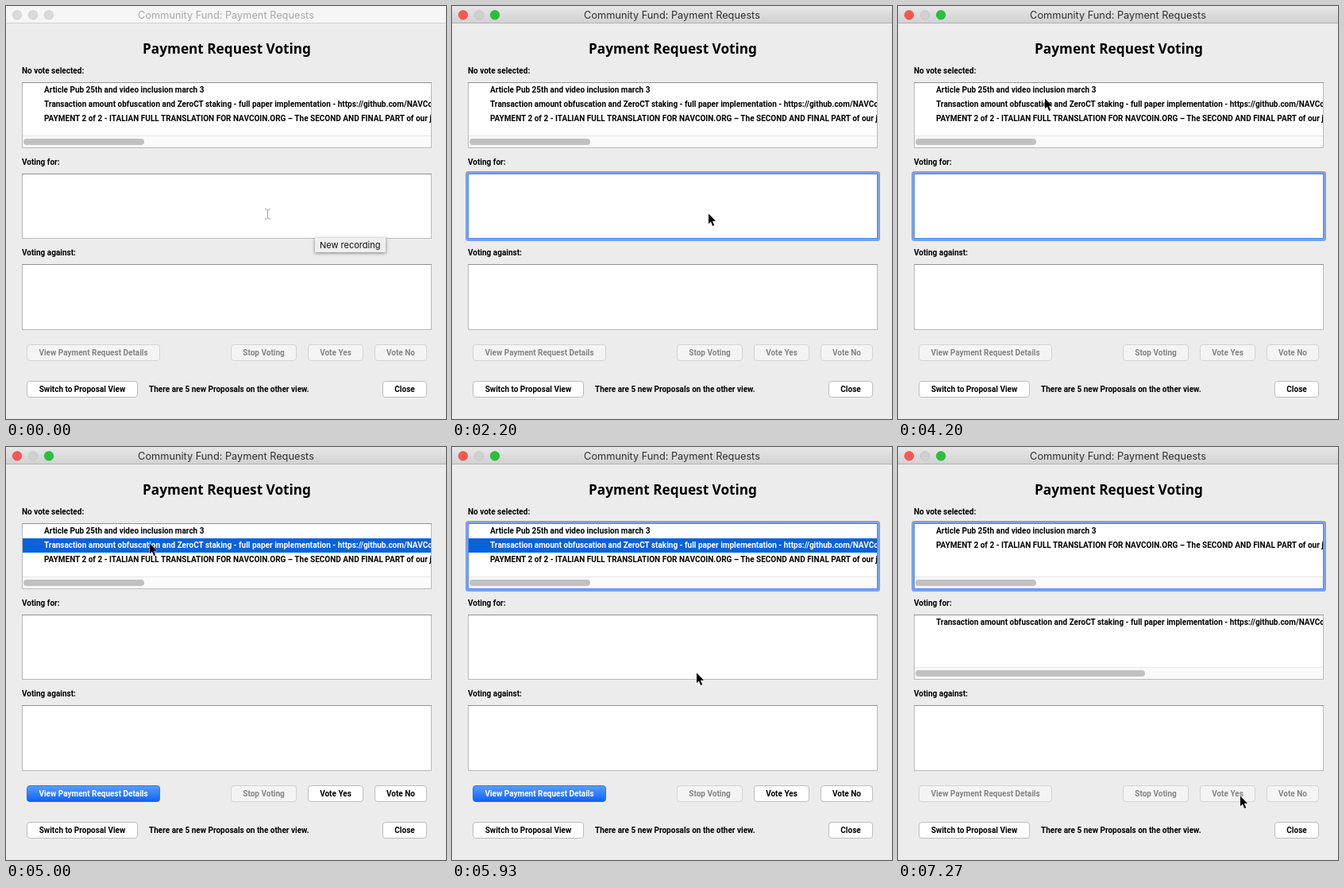
An HTML page for the animation above (8000 ms loop, 554x520 px).

```html
<!DOCTYPE html>
<html lang="en">
<head>
<meta charset="utf-8">
<title>Payment Requests</title>
<style>
  html, body { margin: 0; width: 100%; height: 100%; overflow: hidden; background: #ececec; }
  svg { display: block; width: 554px; height: 520px; cursor: default; }
  text { white-space: pre; font: bold 10px Roboto, sans-serif; }
  .caption { font: 12.75px Inter, sans-serif; text-anchor: middle; }
  .heading { font: 600 17.2px "Noto Sans", "Open Sans", sans-serif; text-anchor: middle; }
  .tip { font: 11px Inter, sans-serif; fill: #111; }
  .button text { text-anchor: middle; }
  .button rect { fill: #fff; stroke: #bdbdbd; }
  .button.off rect { fill: #f4f4f4; stroke: #d3d3d3; }
  .button.off text { fill: #858585; }
  .button.primary rect { fill: url(#blue); stroke: #2a73ee; }
  .button.primary text { fill: #fff; }
  #tooltip rect { fill: #efefef; filter: drop-shadow(0 1px 2px #0007); }
</style>
</head>
<body>
<svg id="stage" viewBox="0 0 554 520"></svg>
<script>
const LOOP = 8000, ACTIVATE = 930, SELECT = 5000, VOTE = 7130;

// Pointer stops: time, x, y
const STOPS = [
  [0, 328, 262], [1660, 328, 262], [1730, 325, 261], [2000, 325, 261],
  [2200, 322, 260], [3200, 200, 142], [3670, 188, 121], [4000, 188, 121],
  [4200, 184, 115], [4470, 180, 120], [5400, 180, 120],
  [6400, 413, 419], [7000, 430, 438], [LOOP, 430, 438]
];

const ARTICLE = "Article Pub 25th and video inclusion march 3";
const STAKING = "Transaction amount obfuscation and ZeroCT staking - full paper implementation - https://github.com/NAVCoin";
const ITALIAN = "PAYMENT 2 of 2 - ITALIAN FULL TRANSLATION FOR NAVCOIN.ORG – The SECOND AND FINAL PART of our journey";

const text = (x, y, label, attrs = "") => `<text x="${x}" y="${y}" ${attrs}>${label}</text>`;

const button = (id, x, y, width, label, state = "") =>
  `<g id="${id}" class="button ${state}">
    <rect x="${x + .5}" y="${y + .5}" width="${width - 1}" height="20" rx="3.5"/>
    ${text(x + width / 2, y + 14, label)}
  </g>`;

const listBox = (id, y, height) =>
  `<rect x="20.5" y="${y + .5}" width="515" height="${height - 1}" fill="#fff" stroke="#b9b9b9"/>
   <path d="M20 ${y + .5}H536" stroke="#929292"/>
   <g id="${id}" clip-path="url(#inside)"></g>
   <g id="${id}Ring" fill="none" opacity="0">
     <rect x="18.5" y="${y - 1.5}" width="519" height="${height + 3}" rx="2" stroke="#78a3ea" stroke-width="3"/>
     <rect x="20.5" y="${y + .5}" width="515" height="${height - 1}" stroke="#5389df"/>
   </g>`;

const scrollbar = (y, width) =>
  `<rect x="21" y="${y}" width="514" height="15" fill="#fafafa"/>
   <path d="M21 ${y + .5}H535" stroke="#e6e6e6"/>
   <rect x="22" y="${y + 4}" width="${width}" height="8" rx="4" fill="#c1c1c1"/>`;

const rows = (top, labels, selected = -1) => labels.map((label, i) =>
  (i === selected ? `<rect x="21" y="${top + 18 * i}" width="514" height="18" fill="#0862d9"/>` : "") +
  text(48, top + 12 + 18 * i, label, i === selected ? 'fill="#fff"' : "")).join("");

const gradient = (id, from, to) =>
  `<linearGradient id="${id}" x2="0" y2="1"><stop stop-color="${from}"/><stop offset="1" stop-color="${to}"/></linearGradient>`;

stage.innerHTML = `
  <defs>
    ${gradient("blue", "#5a9fff", "#0c60fc")}
    ${gradient("bar", "#e7e7e7", "#d2d2d2")}
    <clipPath id="inside"><rect x="21" y="90" width="514" height="330"/></clipPath>
  </defs>
  <rect width="554" height="520" fill="#ececec"/>
  <rect id="titleBar" width="554" height="21"/>
  <path id="barLine" d="M0 21.5H554"/>
  <g id="lights">${[14, 34, 54].map(x => `<circle cx="${x}" cy="11.3" r="5.8" stroke-width=".6"/>`).join("")}</g>
  ${text(277, 16, "Community Fund: Payment Requests", 'id="caption" class="caption"')}
  ${text(278, 60, "Payment Request Voting", 'class="heading"')}
  ${text(20, 85, "No vote selected:")}
  ${text(20, 200, "Voting for:")}
  ${text(20, 314, "Voting against:")}
  ${listBox("pending", 96, 83)}
  ${listBox("approved", 211, 82)}
  ${listBox("rejected", 325, 83)}
  ${button("details", 26, 426, 168, "View Payment Request Details")}
  ${button("stop", 283, 426, 83, "Stop Voting", "off")}
  ${button("yes", 380, 426, 70, "Vote Yes")}
  ${button("no", 464, 426, 66, "Vote No")}
  ${button("switchView", 26, 472, 140, "Switch to Proposal View")}
  ${button("closeView", 474, 472, 56, "Close")}
  ${text(180, 486, "There are 5 new Proposals on the other view.")}
  <g id="tooltip">
    <rect x="389" y="292" width="89" height="18"/>
    ${text(395, 305, "New recording", 'class="tip"')}
  </g>
  <path id="beam" d="M326 255.5Q329.5 255.5 329.5 258V266Q329.5 268.5 326 268.5M333 255.5Q329.5 255.5 329.5 258M329.5 266Q329.5 268.5 333 268.5"
    fill="none" stroke="#a0a0a0"/>
  <path id="arrow" d="M1 1.5V14.3L3.9 11.6L6.2 17L8.2 16.1L5.9 10.8H10Z" stroke="#fff" paint-order="stroke"/>`;

const get = id => document.getElementById(id);
const clamp = v => Math.min(1, Math.max(0, v));
const smooth = v => v * v * (3 - 2 * v);

function pointerAt(t) {
  const i = STOPS.findIndex(stop => stop[0] > t);
  const [t0, x0, y0] = STOPS[i - 1], [t1, x1, y1] = STOPS[i];
  const k = smooth((t - t0) / (t1 - t0));
  return [x0 + (x1 - x0) * k, y0 + (y1 - y0) * k];
}

function setWindow(active) {
  get("titleBar").setAttribute("fill", active ? "url(#bar)" : "#f6f6f6");
  get("barLine").setAttribute("stroke", active ? "#b2b2b2" : "#d2d2d2");
  get("caption").setAttribute("fill", active ? "#303030" : "#a8a8a8");
  const colors = active ? ["#fc5753", "#d0d0d0", "#27c13c"] : Array(3).fill("#dadada");
  const edges = active ? ["#df443f", "#bcbcbc", "#1aab29"] : Array(3).fill("#c8c8c8");
  [...get("lights").children].forEach((light, i) => {
    light.setAttribute("fill", colors[i]);
    light.setAttribute("stroke", edges[i]);
  });
}

function setPhase(phase) {
  const selected = phase === 2, voted = phase === 3;
  setWindow(phase > 0);
  get("pending").innerHTML = scrollbar(163, 152) +
    rows(97, voted ? [ARTICLE, ITALIAN] : [ARTICLE, STAKING, ITALIAN], selected ? 1 : -1);
  get("approved").innerHTML = voted ? scrollbar(277, 289) + rows(212, [STAKING]) : "";
  get("details").setAttribute("class", selected ? "button primary" : "button off");
  for (const id of ["yes", "no"]) get(id).setAttribute("class", selected ? "button" : "button off");
  get("beam").setAttribute("visibility", phase ? "hidden" : "visible");
  get("arrow").setAttribute("visibility", phase ? "visible" : "hidden");
}

let shown = -1;
function draw(now) {
  const t = now % LOOP;
  const phase = [ACTIVATE, SELECT, VOTE].filter(start => t >= start).length;
  if (phase !== shown) setPhase(shown = phase);
  const woken = clamp((t - ACTIVATE) / 330);
  get("tooltip").setAttribute("opacity", 1 - woken);
  get("approvedRing").setAttribute("opacity", t < SELECT ? woken : 0);
  get("pendingRing").setAttribute("opacity", clamp((t - SELECT) / 240));
  get("arrow").setAttribute("transform", `translate(${pointerAt(t).map(Math.round)})`);
}

const start = performance.now();
function tick() {
  draw(performance.now() - start);
  requestAnimationFrame(tick);
}
tick();
</script>
</body>
</html>
```
